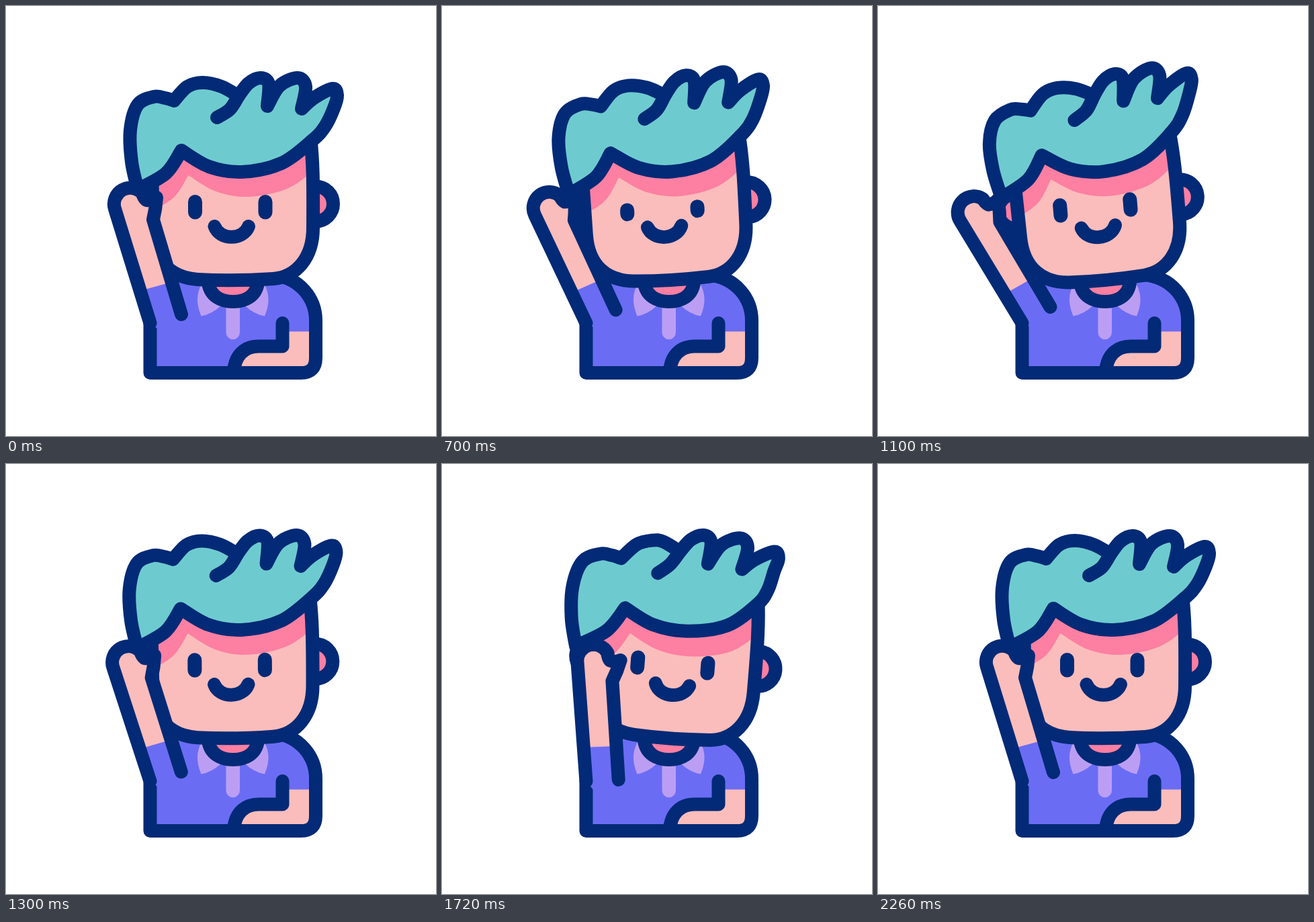
These frames come from a looping animation (640 by 640 pixels, 2400 ms). An HTML page:

```html
<!DOCTYPE html>
<html lang="en">
<head>
<meta charset="utf-8">
<title>Waving boy</title>
<style>
  html, body { margin: 0; width: 100%; height: 100%; overflow: hidden; background: #fff; }
  svg { display: block; width: 100%; height: 100%; }
  .line { stroke: #032a76; stroke-width: 20; stroke-linecap: round; stroke-linejoin: round; }
  .skin { fill: #fbbdbb; }
  .shade { fill: #fd7fa2; }
  .shirt { fill: #6b6cf4; }
  .collar { fill: #bb9ef3; }
  .hair { fill: #6dcbcf; }
  .open { fill: none; }
</style>
</head>
<body>
<svg viewBox="0 0 640 640">
  <defs>
    <path id="face" d="M453 195C457 230 457.5 260 457 330C457 375 432 403 398 406Q338 410 285 407C245 404 220 380 219 335L217 235L262 200Z"/>
    <clipPath id="faceClip"><use href="#face"/></clipPath>
    <path id="flap" d="M291 414C283 429 283 443 290.5 461.5Q306 459 320 446Z"/>
    <path id="hair"/>
  </defs>

  <g id="body">
    <path class="shirt" d="M214 472L250 400H396C438 404 461 436 461 468V524Q461 546 439 546H214Z"/>
    <path class="skin" d="M339 546C340 520 355 506 376 506H411V484.5H461V524Q461 546 439 546Z"/>
    <use href="#flap" class="collar"/>
    <use href="#flap" class="collar" transform="matrix(-1 0 0 1 675.5 0)"/>
    <path class="collar" d="M327.5 445H348V486A10.2 10.2 0 0 1 327.5 486Z"/>
    <path class="shade line" d="M301 412C304 432 320 440 338 440S372 432 375 412"/>
    <path class="line open" d="M396 400C438 404 461 436 461 468V524Q461 546 439 546H214.5V472"/>
    <path class="line open" d="M411.5 472V506.5H376C355 506.5 340 520 339 546"/>
  </g>

  <g id="head">
    <circle class="shade line" cx="215" cy="294.5" r="26"/>
    <circle class="shade line" cx="461" cy="294.5" r="26"/>
    <use href="#face" class="skin"/>
    <g clip-path="url(#faceClip)"><use href="#hair" class="shade" x="10.5" y="37"/></g>
    <use href="#face" class="line open"/>
    <path id="eyes" class="line open" style="stroke-width:21"/>
    <path class="line open" d="M310.5 328C318 349 353 349 361 328"/>
    <use href="#hair" class="hair line"/>
    <path id="strand" class="line open"/>
  </g>

  <g id="arm">
    <path class="skin" d="M214 472L162 302A24 24 0 0 1 203 279L209 289L224 285L219 318L261 459Z"/>
    <path class="shirt" d="M199 424L248 410.5L261 459L258 490L232 485L214 472Z"/>
    <path class="line open" d="M214.5 472L162 302A24 24 0 0 1 203 279Q205 286 209 289Q218 290 224 285Q223 302 219 318L261 459"/>
  </g>
</svg>
<script>
const LOOP = 2400, HALF_SWING = 600, START = 400;
const LEFT = -16.4, RIGHT = 14.5;
const $ = id => document.getElementById(id);
const clamp = x => Math.min(1, Math.max(0, x));
const smooth = x => x * x * (3 - 2 * x);

// Points each lock of hair runs through; locks meet in sharp corners.
const locks = [
  '196,273 187,232 185,185 196,147 220,135 237,137 250,141',
  '250,141 270,120 293,114 321,120 346,134',
  '346,134 361,115 379,107 391,116 389,149',
  '389,149 407,119 434,107 446,120 440,153',
  '440,153 458,137 486,123 493,133 488,152 475,179 456,200 410,234 351,247 302,239 261,215',
  '261,215 238,249 196,273'
].map(parse);
const strand = parse('346,134 333,154 314,166');

function parse(text) {
  return text.split(' ').map(pair => pair.split(',').map(Number));
}

// Hair is soft: leaning left lifts the front, leaning right slides
// the front back and lets the back droop.
function sway([x, y], angle) {
  const top = clamp((215 - y) / 60);
  if (angle < 0) return [x, y - angle / 190 * (335 - x) * top];
  const k = angle / 12.3;
  const back = Math.max(0, 340 - x);
  const front = clamp((x - 290) / 25) * top;
  return [x - k * (0.055 * back + 14 * front), y + k * (0.06 * back - 4 * front)];
}

// Smooth cubic segments through all points.
function spline(points) {
  const at = i => points[Math.min(points.length - 1, Math.max(0, i))];
  const handle = (i, sign) => at(i).map((v, axis) =>
    (v + sign * (at(i + 1)[axis] - at(i - 1)[axis]) / 6).toFixed(2));
  return points.slice(1).map((end, i) =>
    `C${handle(i, 1)} ${handle(i + 1, -1)} ${end.map(v => v.toFixed(2))}`).join('');
}

function hairPath(runs, angle) {
  const swayed = runs.map(run => run.map(point => sway(point, angle)));
  return 'M' + swayed[0][0] + swayed.map(spline).join('');
}

function armAngle(t) {
  const phase = (t - START) / HALF_SWING;
  const ease = step => smooth(clamp(phase - step));
  return LEFT * ease(0) + (RIGHT - LEFT) * ease(1) - RIGHT * ease(2);
}

// One blink in the middle of the first and of the last swing.
function blink(t) {
  const closing = step => clamp(1 - Math.abs(t - START - HALF_SWING * (step + 0.5)) / 200);
  return smooth(Math.max(closing(0), closing(2)));
}

function draw(t) {
  const angle = armAngle(t);
  const eyeTop = 291.5 + 9.5 * blink(t);
  $('arm').setAttribute('transform', `rotate(${angle} 214 472)`);
  $('head').setAttribute('transform', `rotate(${angle * 0.35} 336 420)`);
  $('eyes').setAttribute('d', `M281.5 ${eyeTop}V307M386 ${eyeTop}V307`);
  $('hair').setAttribute('d', hairPath(locks, angle) + 'Z');
  $('strand').setAttribute('d', hairPath([strand], angle));
}

const start = performance.now();
function tick() {
  draw((performance.now() - start) % LOOP);
  requestAnimationFrame(tick);
}
tick();
</script>
</body>
</html>
```
